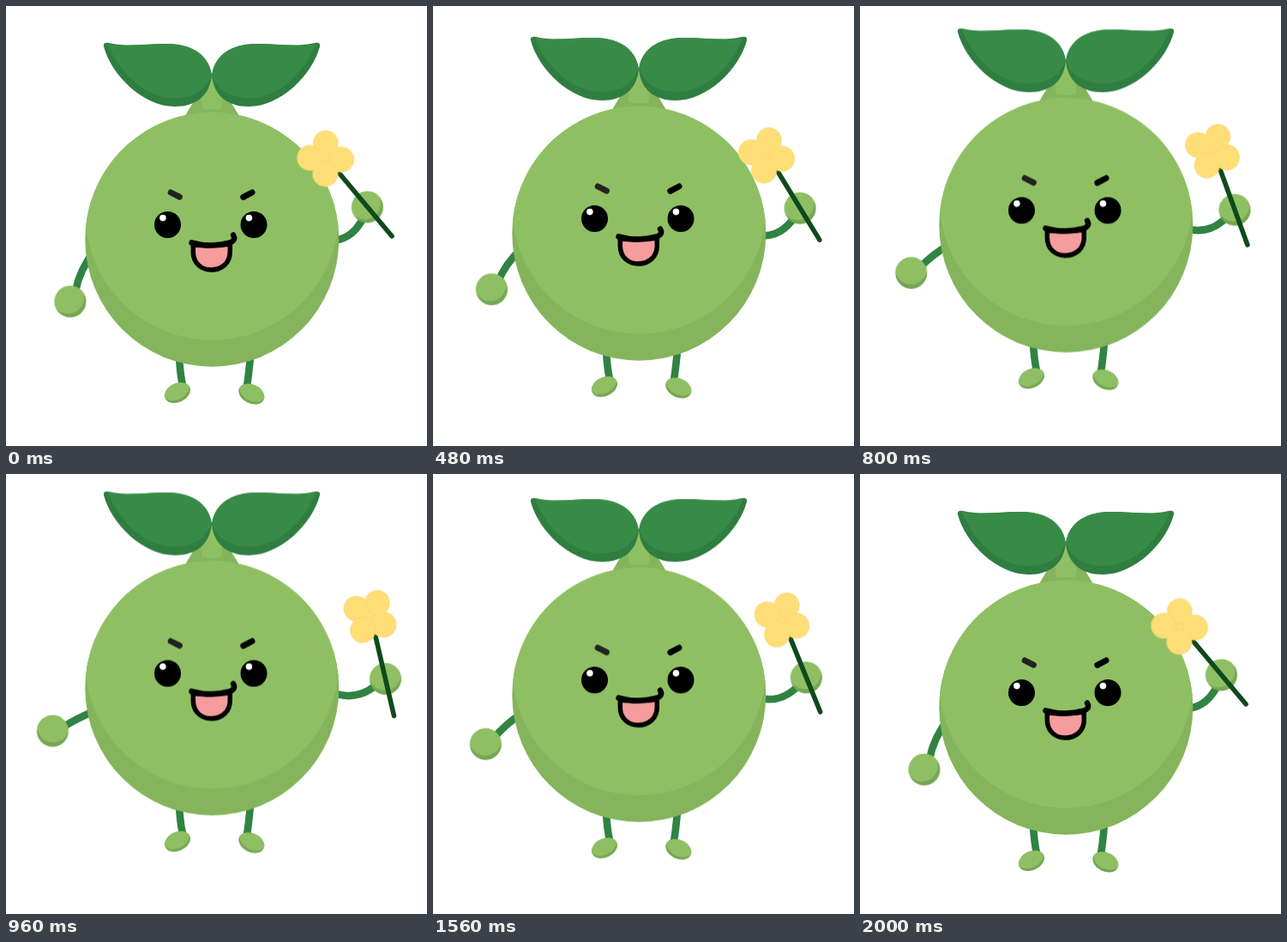
These frames come from a looping animation (491x512 px, 2100 ms). An HTML page:

```html
<!DOCTYPE html>
<html lang="en">
<head>
<meta charset="utf-8">
<title>Waving sprout</title>
<style>
html, body { margin: 0; width: 100%; height: 100%; overflow: hidden; background: #fff; }
svg { display: block; width: 491px; height: 512px; }

.light { fill: #8ec063; }
.shade { fill: #84b45c; }
.deep { fill: #76a652; }
.limb { fill: none; stroke: #308343; stroke-width: 8.6; }
.ink { fill: none; stroke: #000; stroke-width: 6.5; stroke-linecap: round; stroke-linejoin: round; }
.brow { stroke-width: 7; }

/* one second up, one second down, both accelerating, then a short rest */
.move, .bend { animation: move 2.1s ease-in infinite; }
.bend { animation-name: bend; }
@keyframes move {
  0%, 95.238%, 100% { transform: var(--low); }
  47.619% { transform: var(--high); }
}
@keyframes bend {
  0%, 95.238%, 100% { d: var(--low); }
  47.619% { d: var(--high); }
}

#body { --low: translate(0, 0); --high: translate(0, -24px); }
#handL { --low: translate(75px, 344px) rotate(-30deg); --high: translate(53px, 296px) rotate(10deg); }
#handR { --low: translate(421.5px, 234px) rotate(-35deg); --high: translate(444px, 238.8px) rotate(-6deg); }
#flower { --low: translate(372.5px, 177.5px) rotate(0deg); --high: translate(428.1px, 165px) rotate(29deg); }
#armL {
  --low: path("M104 284Q86 306 81 332");
  --high: path("M104 275Q82 283 64 293");
}
#armR {
  --low: path("M380 273Q404 272 417 246");
  --high: path("M380 253Q408 264 431 247");
}
#stalk {
  --low: path("M389 195L450 267.8");
  --high: path("M433.6 187.5L452.7 282.4");
}
</style>
</head>
<body>
<svg viewBox="0 0 491 512">
  <defs>
    <g id="ball">
      <circle class="deep" r="18.5"/>
      <path class="light" d="M-18.3-2.5A18.5 18.5 0 0 1 18.3-2.5A18.5 18.5 0 0 1-18.3-2.5"/>
    </g>
    <g id="leaf">
      <path fill="#2f7d40" d="M114 47Q113 42 120 43C142 48 162 44 187 44C213 44 236 54 240 80C238 104 222 117 197 117C160 117 123 81 114 47Z"/>
      <path fill="#378b47" d="M118.5 44C142 48 162 44 187 44C213 44 236 54 239.5 80C234 98 218 107 196 107C161 107 132 77 118.5 44Z"/>
    </g>
    <g id="eye">
      <circle r="15.5"/>
      <circle cx="-5.6" cy="-7.9" r="3.8" fill="#fff"/>
    </g>
  </defs>

  <path id="armL" class="limb bend" d="M104 284Q86 306 81 332"/>
  <path id="armR" class="limb bend" d="M380 273Q404 272 417 246"/>

  <g id="body" class="move">
    <path class="limb" d="M202 408Q203 428 206 441M285 408Q283 430 281 442"/>
    <use href="#ball" transform="translate(200 450) rotate(-25) scale(.85 .59)"/>
    <use href="#ball" transform="translate(286.3 451.5) rotate(25) scale(.85 .59)"/>

    <path class="shade" d="M240 78C233 96 222 104 209 128H272C259 104 248 96 240 78Z"/>
    <path class="light" d="M240 80C237 92 228 99 228 108V116Q228 120 232 120H248Q252 120 252 116V108C252 99 243 92 240 80Z"/>
    <use href="#leaf"/>
    <use href="#leaf" transform="matrix(-1 0 0 1 480 0)"/>

    <g transform="translate(240.3 271.7)">
      <circle class="shade" r="148"/>
      <path class="light" d="M-147.2-15.5A148 148 0 0 1 147.2-15.5A148 148 0 0 1-147.2-15.5"/>
    </g>

    <use href="#eye" x="188.5" y="254.5"/>
    <use href="#eye" x="289" y="254.5"/>
    <path class="ink brow" style="stroke:#222" d="M192.2 217L202.4 222.2"/>
    <path class="ink brow" d="M276.8 222.4L287 217"/>
    <path class="ink" style="fill:#f59c9d;stroke-width:5.5" d="M218.3 278V286C218.3 299 227.5 307 239.5 307C251.5 307 261.3 299 261.3 286V277Q240 280 218.3 278Z"/>
    <path class="ink" d="M216.5 275.3Q239 281.5 259 276Q269 273.5 265 266.5"/>
  </g>

  <g id="handL" class="move"><use href="#ball"/></g>
  <g id="handR" class="move"><use href="#ball"/></g>

  <path id="stalk" class="bend" d="M389 195L450 267.8" fill="none" stroke="#0f4a1c" stroke-width="5.6" stroke-linecap="round"/>
  <g id="flower" class="move" fill="#ffde77" stroke="#fad267" stroke-width=".6">
    <circle r="8" stroke="none"/>
    <circle cx=".3" cy="-18" r="14.5"/>
    <circle cx="-18.3" cy="-.8" r="14.7"/>
    <circle cx="18.5" cy="1.2" r="14.7"/>
    <circle cx="-.2" cy="17.9" r="14.7"/>
  </g>
</svg>
</body>
</html>
```
